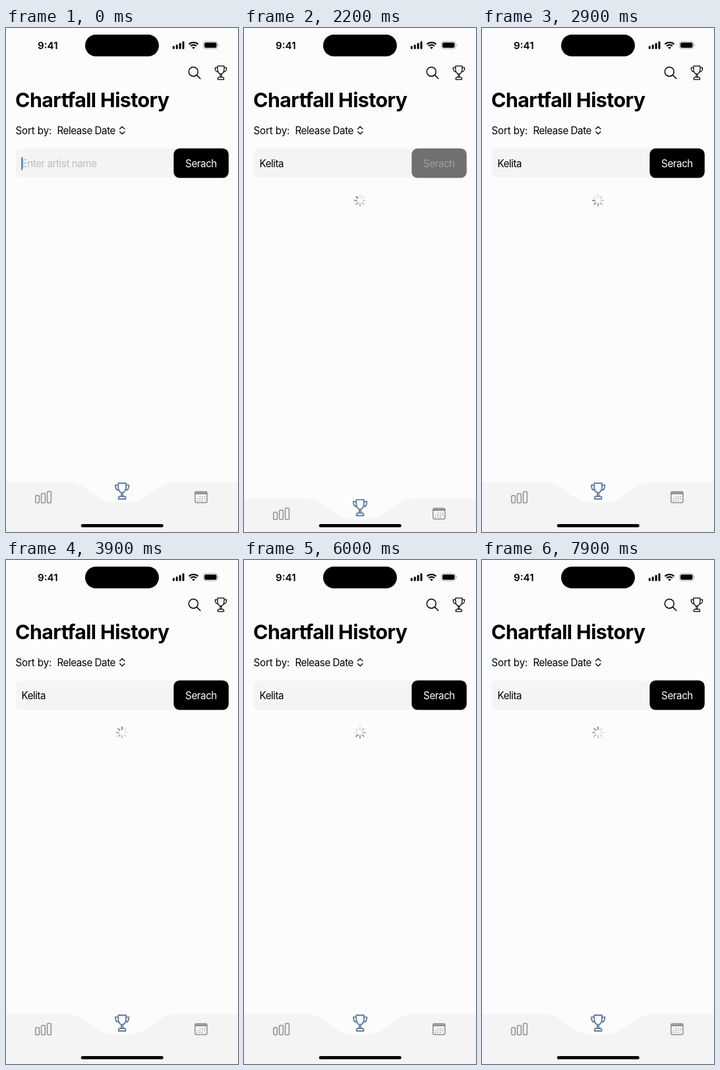
These frames come from a looping animation (352x764 px, 8000 ms). An HTML page:

```html
<!DOCTYPE html>
<html lang="en">
<head>
<meta charset="utf-8">
<title>Chart search</title>
<style>
  html, body { margin: 0; width: 100%; height: 100%; overflow: hidden; background: #fcfcfc; }
  svg { display: block; width: 352px; height: 764px; }
  text { font: 15.2px Inter, sans-serif; letter-spacing: -.03em; white-space: pre; }
  .title { font-size: 30.45px; font-weight: 700; letter-spacing: -.02em; }
  .clock { font-weight: 600; letter-spacing: 0; }
  .sort { letter-spacing: -.01em; }
  .line { fill: none; stroke: #000; stroke-width: 1.5; stroke-linecap: round; stroke-linejoin: round; }
  .line * { vector-effect: non-scaling-stroke; }
  .gray { stroke: #8e8e93; }
  .blue { stroke: #667fa6; stroke-width: 2; }
</style>
</head>
<body>
<svg viewBox="0 0 352 764">
  <defs>
    <path id="trophy" d="M6 1h12v7c0 4-3 8-6 8s-6-4-6-8zM6 4H1.5c0 5 2 8 5.5 8M18 4h4.5c0 5-2 8-5.5 8M10.8 16v5.5M13.2 16v5.5M6.5 25.8v-1.6q0-2.5 2.5-2.5h6q2.5 0 2.5 2.5v1.6z"/>
  </defs>
  <rect width="352" height="764" fill="#fcfcfc"/>

  <!-- status bar -->
  <text class="clock" x="48" y="32">9:41</text>
  <rect x="120" y="10" width="112" height="33" rx="16.5"/>
  <path d="M254.3 28.5v2M259.2 26.5v4M264.1 24v6.5M269 21.5v9" fill="none" stroke="#000" stroke-width="3" stroke-linecap="round"/>
  <g fill="none" stroke="#000" stroke-width="2.2">
    <path d="M277.6 24.6a10 10 0 0 1 13.8 0M280.2 27.4a6.3 6.3 0 0 1 8.6 0"/>
    <path d="M284.5 32l-2.3-2.4a3.3 3.3 0 0 1 4.6 0z" fill="#000" stroke="none"/>
  </g>
  <rect x="299.5" y="20.5" width="21.5" height="11" rx="3.5" fill="none" stroke="#aaa"/>
  <rect x="301" y="22" width="18.5" height="8" rx="2.2"/>
  <path d="M322.2 24.2q2 1.8 0 3.6z" fill="#aaa"/>

  <!-- header -->
  <g class="line">
    <circle cx="284.3" cy="66.2" r="7"/>
    <path d="M289.5 71.4l5.3 5.3"/>
    <use href="#trophy" transform="translate(316 56.7) scale(.83)"/>
    <path d="M172.7 153l3.6-3.6 3.6 3.6M172.7 157.2l3.6 3.6 3.6-3.6" stroke-width="1.3"/>
  </g>
  <text class="title" x="14" y="120">Chartfall History</text>
  <text class="sort" x="14.5" y="160.7">Sort by:</text>
  <text x="77.5" y="160.7">Release Date</text>

  <!-- search row -->
  <rect x="14.5" y="183" width="323" height="44" rx="8" fill="#f4f4f4"/>
  <text id="hint" x="23.5" y="210.8" fill="#bcbcbf">Enter artist name</text>
  <text id="entry" x="23.5" y="210.8"></text>
  <rect id="caret" y="195.5" width="2" height="20" rx="1" fill="#2b7de9"/>
  <rect id="button" x="254.4" y="182.6" width="83.4" height="44.7" rx="9"/>
  <text id="label" x="296" y="210.8" text-anchor="middle" fill="#fff">Serach</text>

  <g id="spinner" transform="translate(176 261.5)" stroke="#858585" stroke-width="2.1" stroke-linecap="round"></g>

  <!-- tab bar -->
  <g id="tabs">
    <path d="M0 688H90C128 688 128 720 176 720S224 688 262 688H352V800H0z" fill="#f4f4f4"/>
    <g class="line gray">
      <rect x="44.8" y="708.8" width="5.6" height="11" rx="1.5"/>
      <rect x="53.6" y="705.6" width="5.8" height="14.2" rx="1.5"/>
      <rect x="62.6" y="702.6" width="5.8" height="17.2" rx="1.5"/>
      <rect x="286.8" y="702.8" width="18.2" height="16.6" rx="2.5"/>
      <path d="M287.5 704.5h17M287.5 706h17"/>
      <path d="M294.5 710.5h7.5M290.5 713.5h11.5M290.5 716.5h8" stroke-width="1.6" stroke-dasharray="0 3.6"/>
    </g>
    <use class="line blue" href="#trophy" transform="translate(164.5 689) scale(.97)"/>
  </g>
  <rect x="113.8" y="752.1" width="125" height="4.6" rx="2.3"/>
</svg>
<script>
  const LOOP = 8000, STEP = 100, NAME = 'Kelita';
  const KEYS = [700, 800, 1000, 1000, 1200, 1300];
  const SUBMIT = 2000, BAR_DROP = 76;
  const [hint, entry, caret, button, label, spinner, tabs] =
    ['hint', 'entry', 'caret', 'button', 'label', 'spinner', 'tabs'].map(id => document.getElementById(id));

  const show = (el, on) => el.setAttribute('visibility', on ? 'visible' : 'hidden');
  const clamp = v => Math.min(1, Math.max(0, v));
  const smooth = v => v * v * (3 - 2 * v);

  spinner.innerHTML = Array.from({ length: 8 }, (_, i) =>
    `<path d="M0-4.8V-8.2" transform="rotate(${i * 45})"/>`).join('');

  function barOffset(t) {
    if (t < SUBMIT) return Math.min(111, Math.max(0, (t - 50) * .74));
    const s = (t - SUBMIT) * .0115;   // critically damped return
    return BAR_DROP * (1 + s) * Math.exp(-s);
  }

  function draw(t) {
    const typed = NAME.slice(0, KEYS.filter(k => t >= k).length);
    entry.textContent = typed;
    show(hint, !typed);
    show(caret, t < SUBMIT);
    caret.setAttribute('x', typed ? 23.2 + entry.getComputedTextLength() : 23.2);

    const release = t < SUBMIT ? 1 : smooth(clamp((t - SUBMIT - 40) / 410));
    button.setAttribute('opacity', .3 + .7 * release);
    label.setAttribute('opacity', release);

    tabs.setAttribute('transform', `translate(0 ${barOffset(t)})`);

    show(spinner, t > SUBMIT);
    const head = t / STEP + 1;
    [...spinner.children].forEach((spoke, i) => {
      const age = (head - i) % 8;
      spoke.setAttribute('opacity', Math.max(.22, .95 - age * .13));
    });
  }

  function frame() {
    draw(Math.floor(performance.now() % LOOP / STEP) * STEP);
    requestAnimationFrame(frame);
  }
  frame();
</script>
</body>
</html>
```
